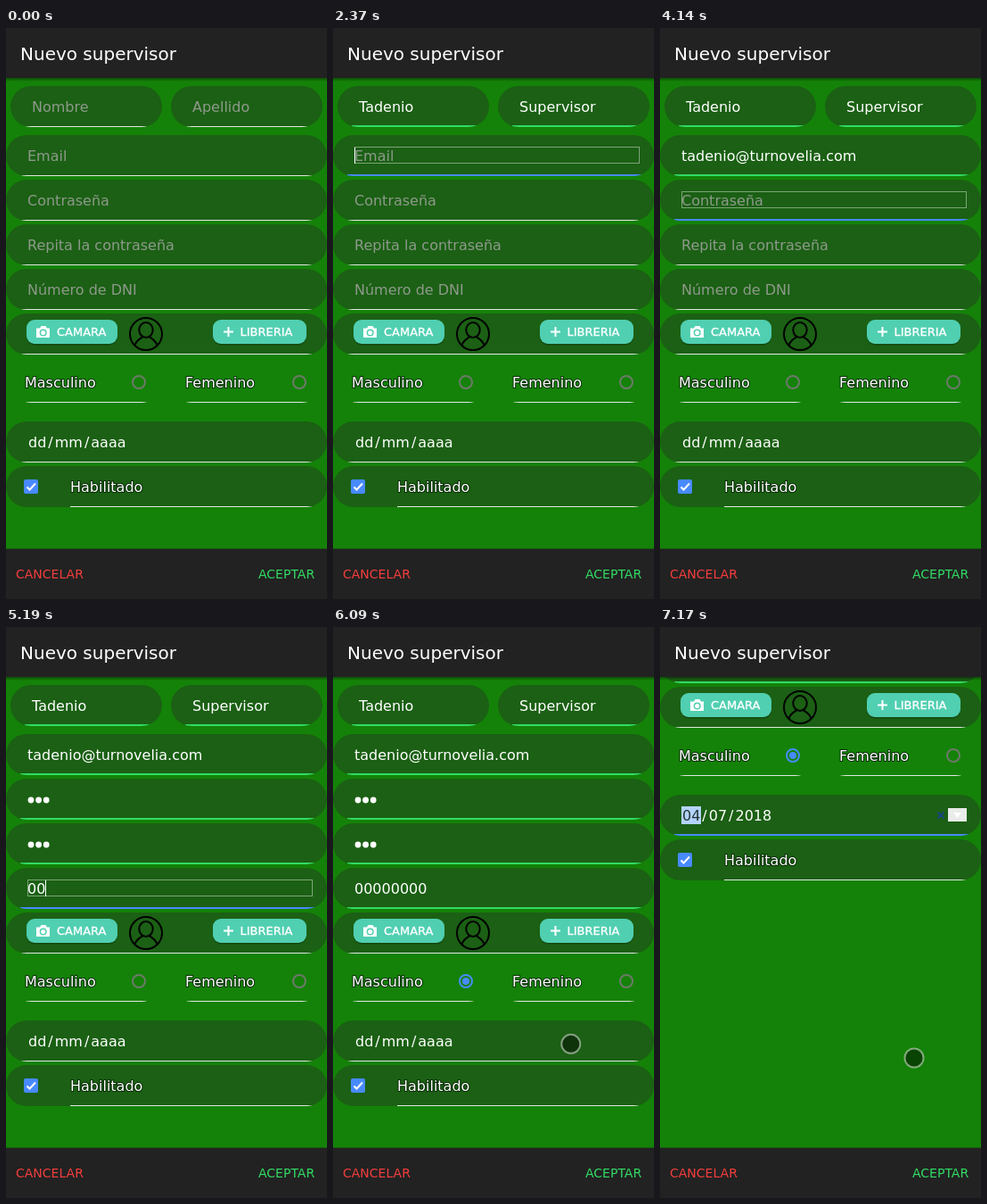
An HTML page for the animation above (7200 ms loop, 360 px wide and 640 px high).

```html
<!DOCTYPE html>
<html lang="es">
<head>
<meta charset="utf-8">
<title>Nuevo supervisor</title>
<style>
  html, body { margin: 0; width: 100%; height: 100%; overflow: hidden; background: #148208; }
  svg { display: block; width: 100%; height: 100%; }
  text { font: 16px "DejaVu Sans", Verdana, sans-serif; fill: #fff; white-space: pre; }
  .title { font-size: 20px; }
  .action { font-size: 14px; }
  .button { font-size: 13px; stroke: #fff; stroke-width: .3px; }
  .label { paint-order: stroke; stroke: #062b03; stroke-width: 2px; stroke-linejoin: round; }
  .calendar text { font: 12px "Liberation Sans", Arial, sans-serif; fill: #111; }
  .calendar .day { text-anchor: middle; }
  .calendar .other { fill: #bbb; }
  .calendar .hover { fill: #17703a; }
</style>
</head>
<body>
<svg id="stage" viewBox="0 0 360 640"></svg>
<script>
const LOOP = 7200;
const SCROLL = 253;
const BLUE = '#488aff', GREEN = '#32db64', WHITE = '#e2e8e1', PILL = '#1b6014', MINT = '#50cfb1';

const T = { radio: 5760, date: 6180, calendar: 6330, picked: 6750 };

const prefixes = word => [...word].map((_, i) => word.slice(0, i + 1));

const fields = [
  { x: 5, y: 65, w: 170, label: 'Nombre', focus: 510, blur: 1560, from: 840, to: 1470,
    steps: ['T', 'Ta', 'Tap', 'Tap', 'Ta', 'Tad', 'Tade', 'Taden', 'Tadeni', 'Tadenio'] },
  { x: 185, y: 65, w: 170, label: 'Apellido', focus: 1560, blur: 2310, from: 1650, to: 2220,
    steps: prefixes('Supervisor'), outline: true },
  { x: 0, y: 120, w: 360, label: 'Email', focus: 2310, blur: 3990, from: 2490, to: 3870,
    steps: prefixes('tadenio@turnovelia.com'), outline: true },
  { x: 0, y: 170, w: 360, label: 'Contraseña', focus: 3990, blur: 4590, from: 4230, to: 4440,
    steps: prefixes('***'), outline: true, secret: true },
  { x: 0, y: 220, w: 360, label: 'Repita la contraseña', focus: 4590, blur: 5010, from: 4680, to: 4890,
    steps: prefixes('***'), outline: true, secret: true },
  { x: 0, y: 270, w: 360, label: 'Número de DNI', focus: 5010, blur: T.radio, from: 5130, to: 5550,
    steps: prefixes('00000000'), outline: true }
];

// Touch pointer trips: [time, x, y]
const trips = [
  [[210, 340, 240], [450, 110, 92], [570, 110, 92], [750, 340, 200]],
  [[5580, -12, 330], [5730, 149, 397], [5790, 149, 397], [5970, 241, 469], [6060, 241, 469],
   [6150, 335, 463], [6180, 335, 463], [6330, 335, 210], [6420, 335, 210], [6660, 121, 345],
   [6780, 121, 345], [7080, 285, 483], [LOOP, 285, 483]]
];

const text = (x, y, str, attrs = '') => `<text x="${x}" y="${y}" ${attrs}>${str}</text>`;
const rect = (x, y, w, h, attrs = '') => `<rect x="${x}" y="${y}" width="${w}" height="${h}" ${attrs}/>`;

let clips = 0;
function pill(x, y, w, { fill = PILL, lineX = x + 16, id = '' } = {}) {
  const clip = `clip${clips++}`;
  return `<clipPath id="${clip}">${rect(x, y, w, 46, 'rx="23"')}</clipPath>
    ${rect(x, y, w, 46, `rx="23" fill="${fill}"`)}
    <g clip-path="url(#${clip})">${rect(lineX, y + 45, x + w - lineX, 1, `fill="${WHITE}" ${id && `id="${id}"`}`)}</g>`;
}

function field({ x, y, w, label, secret }, i) {
  const dots = [0, 1, 2].map(n => `<circle cx="${x + 28 + n * 8.6}" cy="${y + 24}" r="3.4" fill="#fff"/>`).join('');
  return pill(x, y, w, { id: `line${i}` }) +
    text(x + 24, y + 29, label, `id="text${i}"`) +
    (secret ? `<g id="dots${i}">${dots}</g>` : '') +
    rect(x + 24.5, y + 13.5, w - 41, 18, `id="outline${i}" fill="none" stroke="#dfe8dd" stroke-dasharray="1 1"`) +
    rect(x + 24, y + 14, 1, 18, `id="caret${i}" fill="#fff"`);
}

function button(x, w, label, labelX, icon) {
  return rect(x, 328.5, w, 27, 'rx="9" fill="#000" opacity=".25"') +
    rect(x, 327, w, 27, `rx="9" fill="${MINT}"`) + icon + text(labelX, 345, label, 'class="button"');
}

function photoRow() {
  const camera = `<path d="M34 336.5h4l1.500-2.500h5l1.500 2.500h3v10.500h-15z" fill="#fff"/>
    <circle cx="41.700" cy="341.500" r="3.300" fill="#fff" stroke="${MINT}" stroke-width="1.500"/>`;
  const plus = '<path d="M244 340.500h11M249.500 335v11" stroke="#fff" stroke-width="2"/>';
  return pill(0, 320, 360) +
    button(23, 102, 'CAMARA', 57, camera) + button(232, 105, 'LIBRERIA', 262.5, plus) +
    `<g fill="none" stroke="#000" stroke-width="2">
      <circle cx="157" cy="343" r="18"/><ellipse cx="157" cy="338.500" rx="7.700" ry="8.500"/>
      <path d="M144.500 356C146 350 150 348.500 153 346.500M169.500 356C168 350 164 348.500 161 346.500"/></g>`;
}

function radio(x, label, id) {
  return pill(x, 374, 170, { fill: 'none' }) + text(x + 16, 403, label, 'class="label"') +
    `<circle id="${id}" cx="${x + 144}" cy="397" r="7" fill="none" stroke="#6d796a" stroke-width="2"/>`;
}

function dateRow() {
  return pill(0, 441, 360, { id: 'dateLine' }) +
    rect(24, 454, 22, 20, 'id="dateMark" fill="#b4d3fc"') +
    `<text x="25" y="470"><tspan id="day"></tspan><tspan dx="2">/</tspan><tspan dx="2" id="month"></tspan><tspan dx="2">/</tspan><tspan dx="2" id="year"></tspan></text>
    <g id="dateTools">${rect(323, 456, 21, 15, 'fill="#e9ece8"')}<path d="M329 461h9l-4.500 6z" fill="#fff"/></g>
    <path id="dateClear" d="M311.500 460.500l7 7m0-7l-7 7" stroke="#16487c" stroke-width="2.400"/>`;
}

function checkRow() {
  return pill(0, 491, 360, { lineX: 72 }) +
    rect(20, 506, 16, 16, `rx="2" fill="${BLUE}"`) +
    '<path d="M23.500 514.500l3 3 6.500-7" fill="none" stroke="#fff" stroke-width="2"/>' +
    text(72, 520, 'Habilitado', 'class="label"');
}

function calendar() {
  const columns = [...Array(7).keys()].map(i => 53 + 34 * i);
  const heads = ['lu.', 'ma.', 'mi.', 'ju.', 'vi.', 'sá.', 'do.'];
  const symbols = ['M209 242.500v7l-4-3.500z', 'M232 246a3 3 0 1 0 6 0a3 3 0 1 0-6 0', 'M261 242.500v7l4-3.500z'];
  let out = rect(24.5, 223.5, 261, 286, 'fill="#fff" stroke="#b5b5b5"') +
    text(40, 250, 'julio de 2018') + '<path d="M114 244h7l-3.500 4z" fill="#111"/>';
  symbols.forEach((d, i) => {
    out += rect(195.5 + 28 * i, 234.5, 23, 23, 'rx="1" fill="url(#bevel)" stroke="#aaa"') + `<path d="${d}" fill="#707070"/>`;
  });
  out += rect(36, 269, 238, 24, 'fill="#f1f1f1"') + rect(36, 293, 238, 1, 'fill="#bbb"') +
    rect(35.5, 268.5, 239, 230, 'fill="none" stroke="#6f98d0"') +
    rect(206.5, 430.5, 33, 33, 'fill="none" stroke="#b5b5b5"');
  columns.forEach((x, i) => out += text(x, 285, heads[i], 'class="day"'));
  for (let cell = 0; cell < 42; cell++) {
    const n = cell - 5;
    const day = n < 1 ? n + 30 : n > 31 ? n - 31 : n;
    const kind = n < 1 || n > 31 ? 'other' : n === 1 ? 'hover' : '';
    out += text(columns[cell % 7], 315 + 34 * Math.floor(cell / 7), day, `class="day ${kind}"`);
  }
  return `<g id="calendar" class="calendar">${out}</g>`;
}

const stage = document.getElementById('stage');
stage.innerHTML = `
  <defs>
    <linearGradient id="bevel" x2="0" y2="1"><stop stop-color="#f6f6f6"/><stop offset="1" stop-color="#dcdcdc"/></linearGradient>
    <linearGradient id="shade" x2="0" y2="1"><stop stop-opacity=".4"/><stop offset="1" stop-opacity="0"/></linearGradient>
  </defs>
  ${rect(0, 0, 360, 640, 'fill="#148208"')}
  <g id="form">
    ${fields.map(field).join('')}
    ${photoRow()}
    ${radio(5, 'Masculino', 'male')}${radio(185, 'Femenino', 'female')}
    <circle id="maleDot" cx="149" cy="397" r="4" fill="${BLUE}"/>
    ${dateRow()}${checkRow()}
  </g>
  ${rect(0, 0, 360, 56, 'fill="#222"')}${rect(0, 56, 360, 4, 'fill="url(#shade)"')}
  ${text(16, 36, 'Nuevo supervisor', 'class="title"')}
  ${rect(0, 583, 360, 1, 'fill="#176010"')}${rect(0, 584, 360, 56, 'fill="#222"')}
  ${text(11, 617, 'CANCELAR', 'class="action" style="fill:#f53d3d"')}
  ${text(283, 617, 'ACEPTAR', `class="action" style="fill:${GREEN}"`)}
  ${calendar()}
  <circle id="touch" r="10.500" fill="#000" fill-opacity=".48" stroke="#c8d0c6" stroke-opacity=".62" stroke-width="2"/>`;

const el = id => document.getElementById(id);
const set = (id, attrs) => Object.entries(attrs).forEach(([k, v]) => el(id).setAttribute(k, v));
const show = (id, on) => set(id, { visibility: on ? 'visible' : 'hidden' });

function setLine(id, y, color) {
  const thick = color !== WHITE;
  set(id, { y: y + (thick ? 44 : 45), height: thick ? 2 : 1, fill: color });
}

function updateField(f, i, t) {
  const pace = (f.to - f.from) / (f.steps.length - 1);
  const typed = t < f.from ? 0 : Math.min(f.steps.length, Math.floor((t - f.from) / pace + 1e-6) + 1);
  const value = typed ? f.steps[typed - 1] : '';
  const focused = t >= f.focus && t < f.blur;
  const node = el(`text${i}`);

  node.textContent = value ? (f.secret ? '' : value) : f.label;
  node.style.fill = value ? '#fff' : '#8e998b';
  if (f.secret) [...el(`dots${i}`).children].forEach((dot, n) =>
    dot.setAttribute('visibility', n < value.length ? 'visible' : 'hidden'));

  setLine(`line${i}`, f.y, focused ? BLUE : value ? GREEN : WHITE);
  show(`outline${i}`, focused && f.outline);

  const lastKey = typed ? f.from + (typed - 1) * pace : f.focus;
  const width = !value ? 0 : f.secret ? value.length * 8.6 : node.getComputedTextLength();
  set(`caret${i}`, { x: Math.round(f.x + 24 + width) });
  show(`caret${i}`, focused && (t - lastKey) % 240 < 120);
}

function updateTouch(t) {
  const trip = trips.find(p => t >= p[0][0] && t < p[p.length - 1][0]);
  show('touch', trip);
  if (!trip) return;
  const next = trip.findIndex(p => p[0] > t);
  const [t0, x0, y0] = trip[next - 1], [t1, x1, y1] = trip[next];
  const k = (t - t0) / (t1 - t0), e = k * k * (3 - 2 * k);
  set('touch', { cx: x0 + (x1 - x0) * e, cy: y0 + (y1 - y0) * e });
}

function render(t) {
  fields.forEach((f, i) => updateField(f, i, t));

  const male = t >= T.radio, editing = t >= T.date, picked = t >= T.picked;
  set('male', { stroke: male ? BLUE : '#6d796a' });
  show('maleDot', male);

  set('form', { transform: `translate(0 ${editing ? -SCROLL : 0})` });
  setLine('dateLine', 441, editing ? BLUE : WHITE);
  ['dateMark', 'dateTools'].forEach(id => show(id, editing));
  show('dateClear', picked);
  el('day').style.fill = editing ? '#233' : '#fff';
  const date = picked ? ['04', '07', '2018'] : ['dd', 'mm', 'aaaa'];
  ['day', 'month', 'year'].forEach((id, i) => el(id).textContent = date[i]);

  show('calendar', t >= T.calendar && !picked);
  updateTouch(t);
}

const start = performance.now();
function tick() {
  render((performance.now() - start) % LOOP);
  requestAnimationFrame(tick);
}
tick();
</script>
</body>
</html>
```
